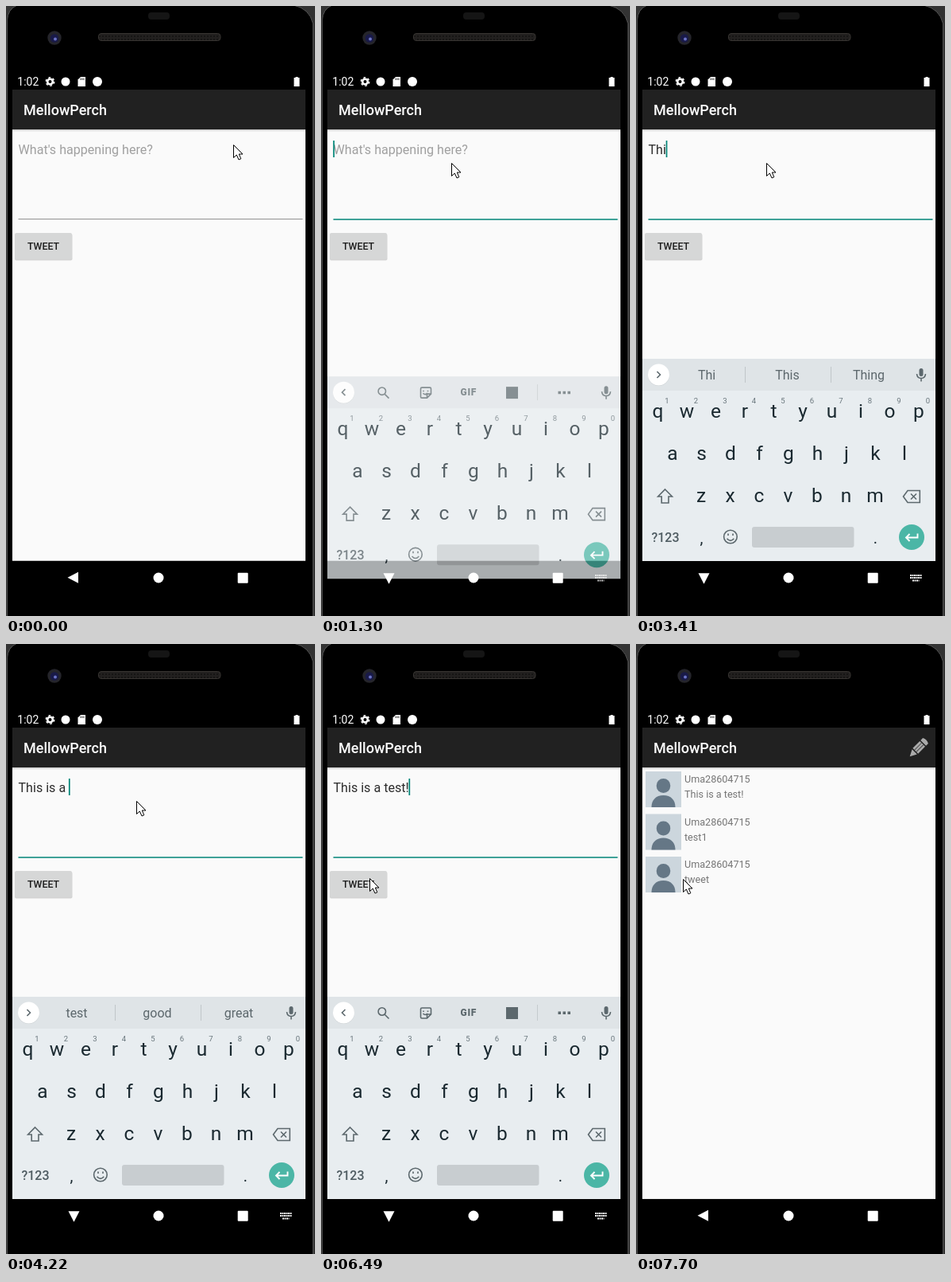
An HTML page for the animation above (8 s loop, 389 px wide and 766 px high).

```html
<!DOCTYPE html>
<html lang="en">
<head>
<meta charset="utf-8">
<title>Compose a post</title>
<style>
  html, body { margin: 0; width: 100%; height: 100%; overflow: hidden; background: #000; }
  svg { display: block; width: 389px; height: 766px; font-family: Roboto, sans-serif; }
  text { white-space: pre; }
  .mid { text-anchor: middle; }
  .line { fill: none; stroke: #5c686d; stroke-width: 1.6; }
  .title { font-size: 18px; font-weight: 500; fill: #fff; }
  .row { font-size: 12.6px; fill: #757575; }
  .key { font-size: 24.5px; fill: #1a2930; }
  .mark { font-size: 20px; fill: #1a2930; }
  .digit { font-size: 9.5px; fill: #68757b; }
  .word { font-size: 16px; fill: #5c676c; }
</style>
</head>
<body>
<svg viewBox="0 0 389 766">
  <defs>
    <linearGradient id="shade" x2="0" y2="1">
      <stop stop-color="#c9c9c9"/><stop offset="1" stop-color="#fafafa"/>
    </linearGradient>
    <pattern id="mesh" width="4" height="4" patternUnits="userSpaceOnUse">
      <rect width="4" height="4" fill="#22201f"/><circle cx="2" cy="2" r="1" fill="#121110"/>
    </pattern>
    <clipPath id="screen"><path d="M8 90H377V710H8Z"/></clipPath>
    <g id="page">
      <path d="M8 105H377V696.700H8Z" fill="#fafafa"/>
      <path d="M8 155H377V158H8Z" fill="url(#shade)"/>
      <path d="M8 105H377V155H8Z" fill="#212121"/>
      <text class="title" x="22" y="137">MellowPerch</text>
    </g>
    <g id="avatar">
      <path d="M0 0H45V45H0Z" fill="#ccd6dd"/>
      <path d="M7.500 45C7.500 36 13 30 22.500 30S37.500 36 37.500 45Z" fill="#657786"/>
      <rect x="13.800" y="9" width="17.400" height="18" rx="8.500" fill="#657786"/>
    </g>
  </defs>

  <!-- phone body -->
  <path d="M0 0H389V766H0Z" fill="#333"/>
  <path d="M1.500 768V18Q2 4 14 -1H362Q382 3 386.500 22V768Z" stroke="#555"/>
  <rect x="179" y="8" width="27" height="9" rx="4" fill="#151515"/>
  <rect x="116.500" y="34.500" width="153.500" height="9" rx="3.500" fill="url(#mesh)" stroke="#383532"/>
  <circle cx="61" cy="40" r="8.700" fill="#25252b"/>
  <circle cx="61" cy="40.500" r="5.300" fill="#191a48"/>
  <circle cx="62" cy="41.500" r="2" fill="#6a72c4"/>

  <g id="compose">
    <use href="#page"/>
    <text id="hint" x="15.500" y="186" font-size="16.100" fill="#a0a0a0">What's happening here?</text>
    <text id="typed" x="15.500" y="186" font-size="16.100" fill="#2b2b2b"></text>
    <rect id="caret" y="169" width="1.700" height="21" fill="#008577"/>
    <path id="underline"/>
    <rect x="11" y="286" width="72.500" height="33.500" rx="2" fill="#c4c4c4" opacity=".7"/>
    <rect id="button" x="11" y="285" width="72" height="33" rx="2"/>
    <text class="mid" x="47" y="306" font-size="12.400" font-weight="500" fill="#1c1c1c">TWEET</text>
  </g>

  <g clip-path="url(#screen)"><g id="list">
    <use href="#page"/>
    <g transform="translate(355.300 130.700) rotate(45)" fill="#aaa">
      <path d="M-4.800 -13Q0 -15.500 4.800 -13V-9H-4.800ZM-4.800 -7.500H4.800V5H-4.800ZM-4.400 6.500H4.400L0 15Z"/>
      <path d="M-1.600 -7.500V5M1.600 -7.500V5" stroke="#4a4a4a"/>
    </g>
    <g id="rows"></g>
  </g></g>

  <g id="keyboard">
    <path d="M8 443H377V697H8Z" fill="#e8edf0"/>
    <path d="M8 443H377V483H8Z" fill="#dfe4e7"/>
    <circle cx="28.500" cy="463.500" r="13.500" fill="#c8cdd0"/>
    <circle cx="28.500" cy="463" r="13.500" fill="#fff"/>
    <path id="chevron" class="line"/>
    <g id="tools">
      <path class="line" d="M80.500 465.500L85.500 470.500M81.500 461.500a4.700 4.700 0 1 1 -9.400 0a4.700 4.700 0 1 1 9.400 0"/>
      <path class="line" d="M127 457H137Q138.500 457 138.500 458.500V465L133.500 470H127Q125.500 470 125.500 468.500V458.500Q125.500 457 127 457ZM138 465H133.500V470M128.500 464Q131 467 134 464M129 460.500v1.500M134.500 460.500v1.500"/>
      <text class="mid" x="185.800" y="467.300" font-size="12" font-weight="900" letter-spacing=".7" fill="#5c686d">GIF</text>
      <path d="M233 456H248V471H233Z" fill="#5c686d"/>
      <path d="M272.500 453V473" stroke="#c5cbce"/>
      <path d="M298.500 461.500h3.500v3.500h-3.500zM304.500 461.500h3.500v3.500h-3.500zM310.500 461.500h3.500v3.500h-3.500z" fill="#5c686d"/>
    </g>
    <g id="words">
      <path d="M137.500 453V473M245.500 453V473" stroke="#c0c6c9"/>
      <text class="mid word" x="89" y="469"></text>
      <text class="mid word" x="190.500" y="469"></text>
      <text class="mid word" x="293" y="469"></text>
    </g>
    <rect x="356.500" y="455" width="5" height="10" rx="2.500" fill="#5c686d"/>
    <path class="line" d="M353.500 462Q354 467.500 359 467.500T364.500 462M359 467V471.500"/>
    <g id="keys"></g>
    <path id="shift" class="line" d="M36.600 607L45.500 616H41V624H32.200V616H27.700Z"/>
    <path class="line" d="M336.500 616L342 608.500H357.300V623.500H342ZM346 612.500L353 619.500M353 612.500L346 619.500"/>
    <text class="mid" x="37" y="672.500" font-size="16" font-weight="500" fill="#4e5b61">?123</text>
    <text class="mid mark" x="82.500" y="675">,</text>
    <path class="line" d="M127.200 666.500a8.300 8.300 0 1 1 -16.600 0a8.300 8.300 0 1 1 16.600 0M114.500 668.800Q119 674 123.300 668.800M116 662.500v2.500M122 662.500v2.500"/>
    <rect x="146" y="654" width="128.500" height="26" rx="3" fill="#c8cdd0"/>
    <text class="mid mark" x="301.300" y="675">.</text>
    <circle cx="347" cy="667" r="16" fill="#4bb6a6"/>
    <path d="M354.500 662.500V667.500H340.500M344.500 663L340 667.500L344.500 672" fill="none" stroke="#fff" stroke-width="1.900"/>
  </g>

  <!-- status bar -->
  <g fill="#fff">
    <text x="14.300" y="100" font-size="14">1:02</text>
    <circle cx="55.500" cy="95" r="3.300" fill="none" stroke="#fff" stroke-width="2.600"/>
    <circle cx="55.500" cy="95" r="5.200" fill="none" stroke="#fff" stroke-width="1.500" stroke-dasharray="2.700 2.745"/>
    <circle cx="75" cy="95" r="5.500"/>
    <path d="M94 89H100V101H90.500V92.500Z"/>
    <path d="M94 90.500v2.500M96 90.500v2.500M98 90.500v2.500" stroke="#000" stroke-width=".8"/>
    <circle cx="115" cy="95" r="6"/>
    <path d="M364.500 89H367.500V90H369.500V101H362.500V90H364.500Z"/>
  </g>

  <!-- navigation bar -->
  <g fill="#fff">
    <path id="back" d="M77.500 717.700L91 710.700V724.700Z"/>
    <circle cx="192" cy="718" r="6.500"/>
    <rect x="291.700" y="711.700" width="13" height="13" rx="1"/>
    <path id="switcher" d="M345 715H359.500M345 718H359.500M348 721.500H356.500" fill="none"
      stroke="#fff" stroke-width="2" stroke-dasharray="1.900 .65"/>
  </g>

  <path id="pointer" d="M.5 .5V16.500L4.300 13L7 19L9.800 17.800L7.300 12H12Z" fill="#fff" stroke="#000"/>
</svg>
<script>
const LOOP = 8000;
const $ = id => document.getElementById(id);
const set = (el, attrs) => { for (const k in attrs) el.setAttribute(k, attrs[k]); };
const show = (el, on) => { el.style.display = on ? '' : 'none'; };

// Value of the latest step [time, value] that has begun.
const at = (steps, t) => steps.findLast(s => s[0] <= t)[1];

const MESSAGE = 'This is a test!';
const typing = [[0, 0], [3410, 3], [3530, 5], [3680, 6], [3800, 7], [3950, 8], [4100, 9], [4220, 10],
  [4750, 11], [4870, 12], [4990, 13], [5110, 14], [5480, 15]];
const guesses = [[0, ''], [3410, 'Thi This Thing'], [3530, 'is was one'], [3680, 'is I in'],
  [3800, "is isn't island"], [3950, 'a the not'], [4100, 'a an and'], [4220, 'test good great'],
  [4750, 't the to'], [4870, 'te test tell'], [4990, 'tes test tests'], [5110, 'test testing tests'], [5600, '']];
const caretOn = [[0, 0], [1060, 1], [1450, 0], [1850, 1], [2350, 0], [2880, 1], [5980, 0], [6490, 1], [6920, 0]];
const pointer = [[0, '286 174'], [150, '262 186'], [270, '225 200'], [390, '195 207'], [540, '172 200'],
  [660, '164 197'], [6230, '143 212'], [6350, '113 229'], [6490, '61 294'], [6770, '59 295']];
const keyboardIn = [[0, 0], [1180, .25], [1300, .73], [1450, 1], [7280, .4], [7400, 0]];
const backTurn = [[0, 0], [1060, -20], [1180, -65], [1300, -90], [7280, -75], [7400, -47], [7550, -5], [7700, 0]];
const pressed = [[0, '#d6d7d7'], [6920, '#cbcccc'], [7040, '#c3c4c4'], [7160, '#cecfcf'], [7280, '#d6d7d7']];
const listZoom = [[0, 1], [7400, 1.028], [7550, 1.004], [7700, 1]];

const keyRow = (letters, x, y) => [...letters].map((c, i) =>
  `<text class="mid key letter" x="${x + i * 36.5}" y="${y}">${c}</text>`).join('');
$('keys').innerHTML = keyRow('qwertyuiop', 27.5, 517) + keyRow('asdfghjkl', 46, 570) + keyRow('zxcvbnm', 82, 623) +
  [...'1234567890'].map((d, i) => `<text class="mid digit" x="${39 + i * 36.5}" y="499">${d}</text>`).join('');
const letters = [...document.querySelectorAll('.letter')];
const wordSlots = [...document.querySelectorAll('.word')];

const posts = [MESSAGE, 'test1', 'tweet'];
$('rows').innerHTML = posts.map((post, i) => `<g transform="translate(12 ${160 + i * 53.5})">
  <use href="#avatar"/><text class="row" x="49" y="14">Uma28604715</text>
  <text class="row" x="49" y="33">${post}</text></g>`).join('');

function drawCompose(t) {
  const text = MESSAGE.slice(0, at(typing, t));
  $('typed').textContent = text;
  show($('hint'), !text);
  show($('caret'), at(caretOn, t));
  set($('caret'), { x: 15.3 + (text ? $('typed').getComputedTextLength() : 0) });
  const focused = t >= 660;
  set($('underline'), {
    d: `M15.500 ${focused ? 268 : 267.6}H373.500`,
    stroke: focused ? '#008577' : '#8f8f8f',
    'stroke-width': focused ? 1.6 : 1
  });
  set($('button'), { fill: at(pressed, t) });
}

function drawKeyboard(t) {
  const p = at(keyboardIn, t);
  show($('keyboard'), p);
  set($('keyboard'), { opacity: p, transform: `translate(0 ${82 * (1 - p)})` });
  set($('switcher'), { opacity: p });

  const words = at(guesses, t);
  show($('tools'), !words);
  show($('words'), words);
  words.split(' ').forEach((w, i) => { wordSlots[i].textContent = w; });
  set($('chevron'), { d: words ? 'M26.500 459L30.500 463L26.500 467' : 'M30.500 459L26.500 463L30.500 467' });

  const upper = t >= 2880 && t < 3410;
  for (const el of letters) {
    const c = el.textContent;
    el.textContent = upper ? c.toUpperCase() : c.toLowerCase();
  }
  $('shift').style.fill = upper ? '#5c686d' : 'none';
}

function drawList(t) {
  show($('list'), t >= 7400);
  set($('list'), { transform: `translate(192.5 401) scale(${at(listZoom, t)}) translate(-192.5 -401)` });
  const posted = t >= 7700;
  show($('rows').firstElementChild, posted);
  set($('rows'), { transform: `translate(0 ${posted ? 0 : -50.7})` });
}

function frame() {
  const t = (performance.now() - start) % LOOP;
  drawCompose(t);
  drawKeyboard(t);
  drawList(t);
  set($('back'), { transform: `rotate(${at(backTurn, t)} 85.5 717.7)` });
  set($('pointer'), { transform: `translate(${at(pointer, t)})` });
  requestAnimationFrame(frame);
}

const start = performance.now();
frame();
</script>
</body>
</html>
```
